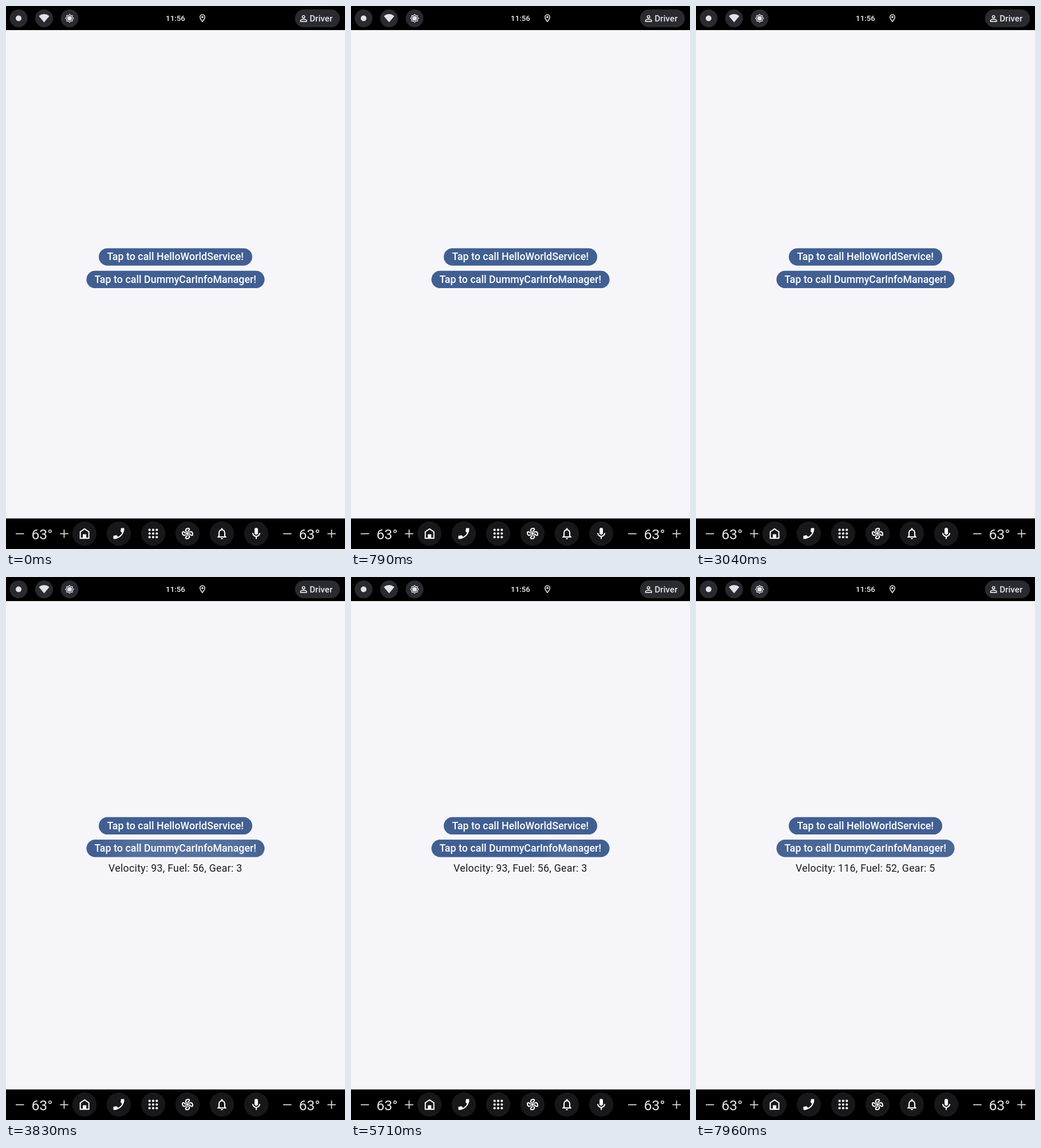
These frames come from a looping animation (592x947 px, 8 s). An HTML page:

```html
<!DOCTYPE html>
<html lang="en">
<head>
<meta charset="utf-8">
<title>Car dashboard</title>
<style>
  html, body { margin: 0; width: 100%; height: 100%; overflow: hidden; background: #f6f6fa; }
  svg { display: block; width: 100%; height: 100%; font-family: Roboto, sans-serif; }
  .label { font-size: 17.76px; font-weight: 500; letter-spacing: .055px; fill: #fff; text-anchor: middle; }
  .status { font-size: 17.76px; letter-spacing: .28px; fill: #191c20; text-anchor: middle; }
  .chip { fill: #292b30; }
  .key { fill: #18181b; }
  .icon { fill: #fff; }
  .line { fill: none; stroke: #fff; stroke-width: 2; }
  .temp { font-size: 24.8px; fill: #e8e8ea; text-anchor: middle; }
  .step { fill: none; stroke: #dcdcd6; stroke-width: 1.7; }
</style>
</head>
<body>
<svg viewBox="0 0 592 947">
  <defs>
    <clipPath id="pill"><rect x="140.5" y="461.7" width="311" height="30.4" rx="15.2"/></clipPath>
    <radialGradient id="glow">
      <stop offset=".55" stop-color="#fff"/>
      <stop offset="1" stop-color="#fff" stop-opacity="0"/>
    </radialGradient>
    <g id="temperature">
      <path class="step" d="M-46 0h14.5M31.3 0h14.5M38.5 -7.2v14.4"/>
      <text class="temp" y="10">63°</text>
    </g>
    <path id="blade" d="M-1.6 -2.8C-4.4 -5 -3.6 -9 1.4 -9C3.8 -9 3.8 -6.4 2.2 -5.4C1.2 -4.8 .7 -4 .5 -2.8"/>
  </defs>

  <rect width="592" height="947" fill="#f6f6fa"/>

  <!-- Status bar -->
  <rect width="592" height="42"/>
  <g class="chip">
    <circle cx="22" cy="21.5" r="15.5"/>
    <circle cx="66.5" cy="21.5" r="15.5"/>
    <circle cx="111" cy="21.5" r="15.5"/>
    <rect x="504.7" y="6" width="78.3" height="31" rx="15.5"/>
  </g>
  <g fill="#e1e2e9">
    <circle cx="22" cy="21.5" r="5"/>
    <path d="M57.3 17.4Q66.5 10.6 75.7 17.4L66.5 28.5Z"/>
    <circle cx="111" cy="21.5" r="4"/>
    <path transform="translate(111 21.5) scale(.7)" fill="none" stroke="#e1e2e9" stroke-width="1.8"
      d="M7 -7V-2.9L9.9 0 7 2.9V7H2.9L0 9.9-2.9 7H-7V2.9L-9.9 0-7-2.9V-7H-2.9L0-9.9 2.9-7Z"/>
  </g>
  <text x="296" y="26.2" font-size="13.3" font-weight="500" fill="#f1f1f3" text-anchor="middle">11:56</text>
  <g transform="translate(343 21.4) scale(.7)">
    <path class="line" d="M0 8.4C-2 6-6-.2-6-3A6 6 0 0 1 6-3C6-.2 2 6 0 8.4Z"/>
    <circle class="icon" cy="-3" r="2.5"/>
  </g>
  <g transform="translate(519.6 21.8) scale(.74)">
    <circle class="line" cy="-4" r="3"/>
    <path class="line" d="M-7 7V5C-7 3-3 2 0 2S7 3 7 5V7Z"/>
  </g>
  <text x="550.2" y="27.4" font-size="15.2" font-weight="500" fill="#e6e7ec" text-anchor="middle">Driver</text>

  <!-- Page content -->
  <g id="content">
    <g fill="#415f91">
      <rect x="162" y="422.4" width="268" height="30.4" rx="15.2"/>
      <rect x="140.5" y="461.7" width="311" height="30.4" rx="15.2"/>
    </g>
    <g clip-path="url(#pill)"><circle id="ripple" cy="480" fill="url(#glow)"/></g>
    <text class="label" x="295.8" y="443.4">Tap to call HelloWorldService!</text>
    <text class="label" x="295.8" y="482.7">Tap to call DummyCarInfoManager!</text>
    <text id="status" class="status" x="295.8" y="517.4"></text>
  </g>

  <!-- Navigation bar -->
  <rect y="893.7" width="592" height="53.3"/>
  <g id="keys" class="key"></g>
  <use href="#temperature" x="63" y="920.3"/>
  <use href="#temperature" x="530" y="920.3"/>
  <path class="line" d="M129.7 928.2V917L137.2 911.9 144.7 917V928.2Z"/>
  <path class="icon" d="M134.2 928.5V921.3H140.2V928.5Z"/>
  <path class="icon" transform="translate(197 920) scale(-1.06 1.06) translate(-12 -12)"
    d="M6.62 10.79c1.44 2.83 3.76 5.14 6.59 6.59l2.2-2.2c.27-.27.67-.36 1.02-.24 1.12.37 2.33.57 3.57.57.55 0 1 .45 1 1V20c0 .55-.45 1-1 1-9.39 0-17-7.61-17-17 0-.55.45-1 1-1h3.5c.55 0 1 .45 1 1 0 1.25.2 2.45.57 3.57.11.35.03.74-.25 1.02z"/>
  <g id="dots" class="icon"></g>
  <g id="fan" class="line" transform="translate(317 920)"><circle r="1.4"/></g>
  <path class="icon" transform="translate(365 908)"
    d="M12 22c1.1 0 2-.9 2-2h-4c0 1.1.9 2 2 2zm6-6v-5c0-3.07-1.63-5.64-4.5-6.32V4c0-.83-.67-1.5-1.5-1.5s-1.5.67-1.5 1.5v.68C7.64 5.36 6 7.92 6 11v5l-2 2v1h16v-1l-2-2zm-2 1H8v-6c0-2.48 1.51-4.5 4-4.5s4 2.02 4 4.5v6z"/>
  <g transform="translate(437 920)">
    <rect class="icon" x="-3" y="-10" width="6" height="12" rx="3"/>
    <path class="line" d="M-6-1A6 6 0 0 0 6-1M0 5V9.5"/>
  </g>
</svg>
<script>
const LOOP = 8000;
const RIPPLE_TIME = 650;
const TAPS = [
  { press: 3600, shown: 3720, x: 310, car: [93, 56, 3] },
  { press: 5670, shown: 5800, x: 372, car: [55, 53, 1] },
  { press: 7500, shown: 7640, x: 330, car: [116, 52, 5] },
];
const byId = id => document.getElementById(id);
const clamp = v => Math.max(0, Math.min(1, v));

function add(parent, tag, attributes) {
  const node = document.createElementNS(parent.namespaceURI, tag);
  for (const name in attributes) node.setAttribute(name, attributes[name]);
  parent.append(node);
}

for (let i = 0; i < 6; i++) add(byId('keys'), 'circle', { cx: 137 + 60 * i, cy: 920, r: 21.2 });
for (let i = 0; i < 9; i++) {
  add(byId('dots'), 'circle', { cx: 250.7 + 6.3 * (i % 3), cy: 913.7 + 6.3 * Math.floor(i / 3), r: 2.1 });
}
for (let i = 0; i < 4; i++) add(byId('fan'), 'use', { href: '#blade', transform: `rotate(${90 * i})` });

function draw(now) {
  const t = now % LOOP;
  const latest = TAPS.filter(tap => t >= tap.shown).pop();
  byId('content').setAttribute('transform', `translate(0 ${latest ? -3.7 : 0})`);
  const [velocity, fuel, gear] = latest ? latest.car : [];
  byId('status').textContent = latest ? `Velocity: ${velocity}, Fuel: ${fuel}, Gear: ${gear}` : '';

  const tap = TAPS.find(({ press }) => t >= press && t < press + RIPPLE_TIME);
  const progress = tap ? (t - tap.press) / RIPPLE_TIME : 1;
  const ripple = byId('ripple');
  ripple.setAttribute('cx', tap ? tap.x : 0);
  ripple.setAttribute('r', 15 + 215 * clamp(progress / .55));
  ripple.setAttribute('opacity', .11 * clamp(progress / .12) * clamp((1 - progress) / .6));
  requestAnimationFrame(draw);
}
requestAnimationFrame(draw);
</script>
</body>
</html>
```
